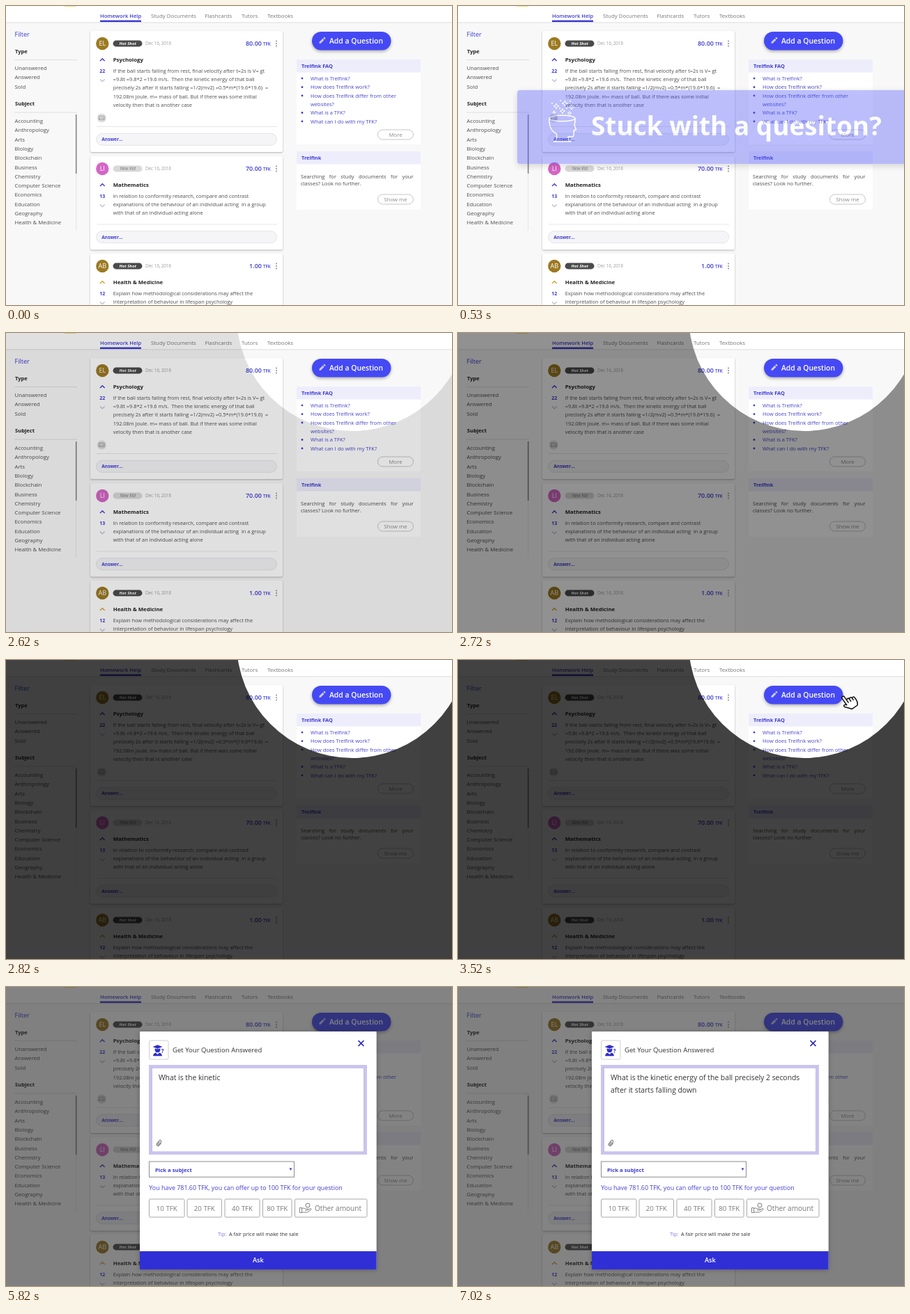
An HTML page that plays this animation: 640 px wide and 430 px high, repeating every 8 s.

```html
<!DOCTYPE html>
<html lang="en">
<head>
<meta charset="utf-8">
<title>Ask a question</title>
<style>
html, body { margin: 0; width: 100%; height: 100%; overflow: hidden; background: #f8f8f8; }
svg { display: block; width: 100%; height: 100%; }
text { font-family: "Open Sans", sans-serif; white-space: pre; }
.card { filter: drop-shadow(0 1px 1px rgba(0,0,0,.28)); }
.lift { filter: drop-shadow(0 2px 2px rgba(0,0,0,.3)); }
.float { filter: drop-shadow(0 3px 5px rgba(0,0,0,.4)); }
.sheet { filter: drop-shadow(0 1px 3px rgba(0,0,0,.25)); }
</style>
</head>
<body>
<svg id="stage" viewBox="0 0 640 430" xmlns="http://www.w3.org/2000/svg"></svg>
<script>
const BLUE = '#3d3bd2', INK = '#4d4d4d', DARK = '#222', BRAND = 'Trelfink', COIN = 'TFK';
const LOOP = 8000;

const text = (x, y, size, str, fill = INK, more = '') =>
  `<text x="${x}" y="${y}" font-size="${size}" fill="${fill}" ${more}>${str}</text>`;
const bold = 'font-weight="700"', semi = 'font-weight="600"', mid = 'text-anchor="middle"';
const rect = (x, y, w, h, fill, more = '') =>
  `<rect x="${x}" y="${y}" width="${w}" height="${h}" fill="${fill}" ${more}/>`;
const line = (d, stroke, width = 1, more = '') =>
  `<path d="${d}" fill="none" stroke="${stroke}" stroke-width="${width}" ${more}/>`;
const group = (body, more = '') => `<g ${more}>${body}</g>`;
const rows = (list, x, y, step, size, fill) =>
  list.map((s, i) => text(x, y + i * step, size, s, fill)).join('');

function header() {
  const tabs = [[208, 'Study Documents'], [285.5, 'Flashcards'], [338, 'Tutors'], [375, 'Textbooks']];
  return rect(0, 0, 640, 23.5, '#fff') + rect(0, 23.3, 640, 1, '#dedede') +
    rect(84, 0, 17, 1, '#efe08a') +
    text(135, 17, 7.6, 'Homework Help', BLUE, semi) + rect(135, 20.5, 59, 2.5, BLUE) +
    tabs.map(([x, s]) => text(x, 17, 7.85, s, '#757575')).join('');
}

function sidebar() {
  const subjects = ['Accounting', 'Anthropology', 'Arts', 'Biology', 'Blockchain', 'Business', 'Chemistry',
    'Computer Science', 'Economics', 'Education', 'Geography', 'Health &amp; Medicine', 'History'];
  return text(12.5, 44.3, 9.1, 'Filter', BLUE) +
    text(13, 67.6, 7.6, 'Type', DARK, bold) + line('M12 77.5H102', '#dedede') +
    rows(['Unanswered', 'Answered', 'Sold'], 12.5, 91.8, 13.4, 7.8) +
    text(13, 143.2, 7.6, 'Subject', DARK, bold) + line('M12 153H102', '#dedede') +
    group(rows(subjects, 12.5, 168, 13.3, 7.8), 'clip-path="url(#listClip)"') +
    line('M100.7 241V323', '#e4e4e4') + line('M100.7 156V241', '#858585', 1.6);
}

function badge(y, rank) {
  const hot = rank === 'Hot Shot';
  return rect(153.5, y + 13.6, 42, 8.8, hot ? '#4b4b4b' : '#d9d9d9', 'rx="4.4"') +
    text(174.7, y + 20.3, hot ? 6 : 6.4, rank, hot ? '#fff' : '#777',
      `${mid} font-style="italic" ${hot ? bold : ''}`);
}

function card(c) {
  const { y, h } = c, end = y + h;
  const dots = [14.5, 18, 21.5].map(d => `<circle cx="388" cy="${y + d}" r="1" fill="#8c8c8c"/>`).join('');
  return rect(121, y, 276, h, '#fff', 'rx="2" class="card"') +
    `<circle cx="138.3" cy="${y + 18}" r="9.2" fill="${c.tint}"/>` +
    text(138.3, y + 21.2, 9, c.who, '#fff', mid) + badge(y, c.rank) +
    text(200, y + 20.4, 6.6, 'Dec 16, 2018', '#a0a0a0', 'letter-spacing="-.2"') +
    text(367, y + 21.2, 9, c.price, BLUE, `text-anchor="end" ${semi}`) +
    text(369, y + 21.2, 6.2, COIN, BLUE, semi) + dots +
    line(`M135 ${y + 43}l3.3-3.3 3.3 3.3`, c.arrow || BLUE, 1.4) +
    text(138.3, y + 59.5, 7, c.votes, BLUE, `${mid} ${bold}`) +
    line(`M135 ${y + 69.5}l3.3 3.3 3.3-3.3`, '#b3b3d6', 1.1) +
    text(153.7, y + 43.7, 7.8, c.title, DARK, bold) +
    rows(c.body, 153.7, y + 59.7, 12.3, 7.4) +
    line(`M130 ${end - 36.5}H389`, '#e6e6e6') +
    rect(129.5, end - 26.7, 259, 17, '#f5f5f8', 'rx="8.5" stroke="#e4e4e6"') +
    text(137.3, end - 15.6, 6.6, 'Answer...', BLUE, bold);
}

const cards = [
  { y: 36, h: 174, who: 'EL', tint: '#9c7a22', rank: 'Hot Shot', price: '80.00', votes: '22', title: 'Psychology', body: [
    'If the ball starts falling from rest, final velocity after t=2s is V= gt',
    '=9.8t =9.8*2 =19.6 m/s.  Then the kinetic energy of that ball',
    'precisely 2s after it starts falling =1/2(mv2) =0.5*m*(19.6*19.6)  =',
    '192.08m joule. m= mass of ball. But if there was some initial',
    'velocity then that is another case'] },
  { y: 216, h: 134.5, who: 'LI', tint: '#d566c6', rank: 'New Kid', price: '70.00', votes: '13', title: 'Mathematics', body: [
    'In relation to conformity research, compare and contrast',
    'explanations of the behaviour of an individual acting  in a group',
    'with that of an individual acting alone'] },
  { y: 356, h: 134.5, who: 'AB', tint: '#9c7a22', rank: 'Hot Shot', price: '1.00', votes: '12', arrow: '#d9a032',
    title: 'Health &amp; Medicine', body: [
    'Explain how methodological considerations may affect the',
    'interpretation of behaviour in lifespan psychology'] }
];

const attachment = `<circle cx="137.3" cy="161" r="6.6" fill="#e0e0e0"/>` +
  line('M133.5 158.3h7.5v5.4h-7.5zM134 163l2.3-2.4 1.6 1.4 1.3-1.2 1.6 1.8', '#8e8e8e', .8);

function pill(y, w, label) {
  return rect(584.5 - w, y, w, 14, '#fff', 'rx="7" stroke="#c6c6c6"') +
    text(584.5 - w / 2, y + 9.8, 7.75, label, '#8a8a8a', mid);
}

function panels() {
  const ys = [106.8, 119.4, 131.6, 156.2, 168.6];
  const links = [`What is ${BRAND}?`, `How does ${BRAND} work?`, `How does ${BRAND} differ from other`,
    `What is a ${COIN}?`, `What can I do with my ${COIN}?`];
  return rect(417, 77, 178, 122, '#fff') + rect(417, 77, 178, 18.5, '#eeedfc') +
    text(424, 89.2, 7.4, `${BRAND} FAQ`, BLUE, bold) +
    links.map((s, i) => `<circle cx="425" cy="${ys[i] - 2.7}" r="1.4" fill="${BLUE}"/>` + text(437, ys[i], 7.5, s, '#4644cf')).join('') +
    text(437, 144, 7.5, 'websites?', '#4644cf') + pill(178, 51, 'More') +
    rect(417, 209, 178, 84, '#fff') + rect(417, 209, 178, 18.5, '#eeedfc') +
    text(424, 221.2, 7.4, BRAND, BLUE, bold) +
    text(423, 248, 7.55, 'Searching for study documents for your', INK, 'word-spacing="4.4"') +
    text(423, 258.4, 7.55, 'classes? Look no further.') + pill(271, 51, 'Show me');
}

const addButton = rect(439, 37, 113.5, 26.5, '#4549f4', 'rx="13.2" class="lift"') +
  `<path d="M449.5 53.8v-2.1l5-5 2.1 2.1-5 5zM455.2 46l1-1q.6-.5 1.2 0l.9.9q.5.6 0 1.2l-1 1z" fill="#c9cbff"/>` +
  text(464, 53.9, 10.4, 'Add a Question', '#fff', semi);

function banner() {
  const star = (x, y, r) => {
    const q = r * .3;
    return `M${x} ${y - r}l${q} ${r - q} ${r - q} ${q} ${q - r} ${q} ${-q} ${r - q} ${-q} ${q - r} ${q - r} ${-q} ${r - q} ${-q}z`;
  };
  const stars = star(141, 144, 4) + star(153.5, 140, 4) + star(163, 145.5, 3.6) + star(150, 151, 3.6) + star(160, 154, 2.6) + star(138, 153, 2.4);
  const dots = [[147, 136], [135, 140], [161, 137], [146, 147], [156, 147]]
    .map(([x, y]) => `<circle cx="${x}" cy="${y}" r="1" fill="#fff"/>`).join('');
  return rect(85, 121, 565, 106, '#5058fb', 'rx="4" fill-opacity=".92" class="float"') +
    line(stars, '#fff', 1, 'stroke-linejoin="round"') + dots +
    `<ellipse cx="149.5" cy="161.5" rx="18.5" ry="4.3" fill="none" stroke="#fff" stroke-width="1.5"/>` +
    line('M131 162C130.5 174 134 180 141.5 184V191Q141 194.5 137.5 195H162Q158 194 158 188H163Q166.5 188 166.3 184L166 179.5 169.5 177.5 167 171Q168.5 167 168 162', '#fff', 1.5, 'stroke-linejoin="round"') +
    text(191, 186, 36.95, 'Stuck with a quesiton?', '#fff', bold);
}

const hand = `<path transform="translate(552 53) rotate(-35)" fill="#fff" stroke="#111" stroke-width="1.5" stroke-linejoin="round"
  d="M-2 12V1.5a2 2 0 0 1 4 0V8a2 2 0 0 1 4 0v1a2 2 0 0 1 4 0v1a1.8 1.8 0 0 1 3.5 0V15q0 4-3 7H1Q-2 18-6 13.5q-1-2.5 1.5-2.5 1 0 2.5 2zM2 8v4M6 9v3.5M10 10v3"/>`;

const graduate = `<path d="M210.5 86l7-2.8 7 2.8-7 2.8zM213.6 88.3q3.9 2 7.8 0v2.2q-.6 3.8-3.9 3.8t-3.9-3.8zM211 99.3q.4-4.2 4-4.8l2.5 2.4 2.5-2.4q3.600.6 4 4.800z" fill="#302fc8"/>` +
  text(222.8, 95, 8, '?', '#302fc8', bold);

const clip = line('M2.2-2V2.500a2.200 2.200 0 0 1-4.400 0V-3a1.600 1.600 0 0 1 3.200 0V2.200a.9.9 0 0 1-1.800 0V-2', '#555', .9,
  'transform="translate(219.8 224.5) rotate(38)"');

function modal() {
  const offers = [[205.5, 50.5, 10], [260, 49.5, 20], [314, 50, 40], [368.5, 41.5, 80]];
  const frame = 'rx="1.5" stroke="#a8a8a8"';
  return rect(192, 64, 339.7, 342, '#fff', 'rx="1" class="sheet"') +
    rect(205.5, 77, 27.5, 27, '#fff', 'rx="2" stroke="#cfcfcf"') + graduate +
    text(239, 93.9, 9.55, 'Get Your Question Answered', '#333') +
    line('M505.5 77l8 8M513.5 77l-8 8', '#2a29bd', 1.7) +
    rect(205, 112, 313, 129, '#cac4ee') + rect(209.5, 116.3, 304, 120.6, '#fff', 'stroke="#b9b2e2" stroke-width=".7"') +
    group(text(219, 134.3, 10.3, 'Type your question...', '#a0a0a0') + line('M218 123V137', '#333'), 'id="hint"') +
    text(219, 134.3, 10.38, '', '#333', 'id="row0"') + text(219, 151.9, 10.38, '', '#333', 'id="row1"') + clip +
    rect(205.5, 251, 208, 22.3, '#fff', 'stroke="#8d8d8d"') +
    text(214, 265.6, 7.75, 'Pick a subject', BLUE, bold) + `<path d="M406.5 260.5h4l-2 3.5z" fill="${BLUE}"/>` +
    text(205.3, 292.3, 8.92, `You have 781.60 ${COIN}, you can offer up to 100 ${COIN} for your question`, '#443fd0') +
    offers.map(([x, w, n]) => rect(x, 305, w, 26, '#fff', frame) +
      text(x + w / 2, 321.8, 9.7, `${n} ${COIN}`, '#777', mid)).join('') +
    rect(414.5, 305, 103.5, 26, '#fff', frame) + text(443, 321.9, 10.1, 'Other amount', '#777') +
    `<circle cx="433" cy="314" r="3" fill="none" stroke="#777"/>` +
    line('M421.5 317.5h3v7h-3zM424.5 318.5q3-1.5 5 .5h3.5q1.5 1.5-.5 2h-3.5M433 320.5l4-2q2 .5.5 2l-5 3.5h-8', '#777', .9) +
    text(304, 357.8, 7.38, 'Tip:', '#7a70dd') + text(320, 357.8, 7.38, 'A fair price will make the sale', '#333') +
    rect(192, 380, 339.7, 26.2, '#302fd6') + text(361.8, 396.4, 9.2, 'Ask', '#fff', `${mid} ${semi}`);
}

const stage = document.getElementById('stage');
stage.innerHTML = `<defs><clipPath id="listClip">${rect(0, 155, 110, 168, '#000')}</clipPath></defs>` +
  rect(0, 0, 640, 430, '#f8f8f8') + header() + sidebar() + cards.map(card).join('') + attachment + panels() + addButton +
  group(banner(), 'id="banner"') +
  '<path id="spot" fill-rule="evenodd" d="M0 0H640V430H0zM331 -25a166 166 0 0 1 332 0a166 166 0 0 1 -332 0z"/>' +
  group(hand, 'id="hand"') +
  group(rect(0, 0, 640, 430, '#222', 'opacity=".56"') + modal(), 'id="dialog"');

const el = {};
for (const id of ['banner', 'spot', 'hand', 'dialog', 'hint', 'row0', 'row1']) el[id] = document.getElementById(id);

const words = [
  'What is the kinetic energy of the ball precisely 2 seconds'.split(' '),
  'after it starts falling down'.split(' ')
];
const show = (node, on) => node.setAttribute('display', on ? 'inline' : 'none');
// whole steps done since start, counting the first as 1
const steps = (t, start, length, max) =>
  Math.max(0, Math.min(max, Math.floor((t - start) / length) + 1));

function draw(t) {
  show(el.banner, t >= 500 && t < 2620);
  el.banner.setAttribute('opacity', steps(t, 500, 30, 5) / 5);

  const dim = steps(t, 2620, 100, 3);
  show(el.spot, dim > 0 && t < 4520);
  el.spot.setAttribute('opacity', .12 + .31 * (dim - 1));

  const near = steps(t, 3320, 100, 3);
  show(el.hand, near > 0 && t < 4520);
  el.hand.setAttribute('transform', `translate(${18 * (3 - near)} ${8.5 * (3 - near)})`);

  show(el.dialog, t >= 4520);
  const typed = steps(t, 5520, 100, 16), first = words[0].length;
  show(el.hint, typed === 0);
  el.row0.textContent = words[0].slice(0, typed).join(' ');
  el.row1.textContent = words[1].slice(0, Math.max(0, typed - first)).join(' ');
}

const begin = performance.now();
function tick() {
  draw((performance.now() - begin) % LOOP);
  requestAnimationFrame(tick);
}
draw(0);
requestAnimationFrame(tick);
</script>
</body>
</html>
```
